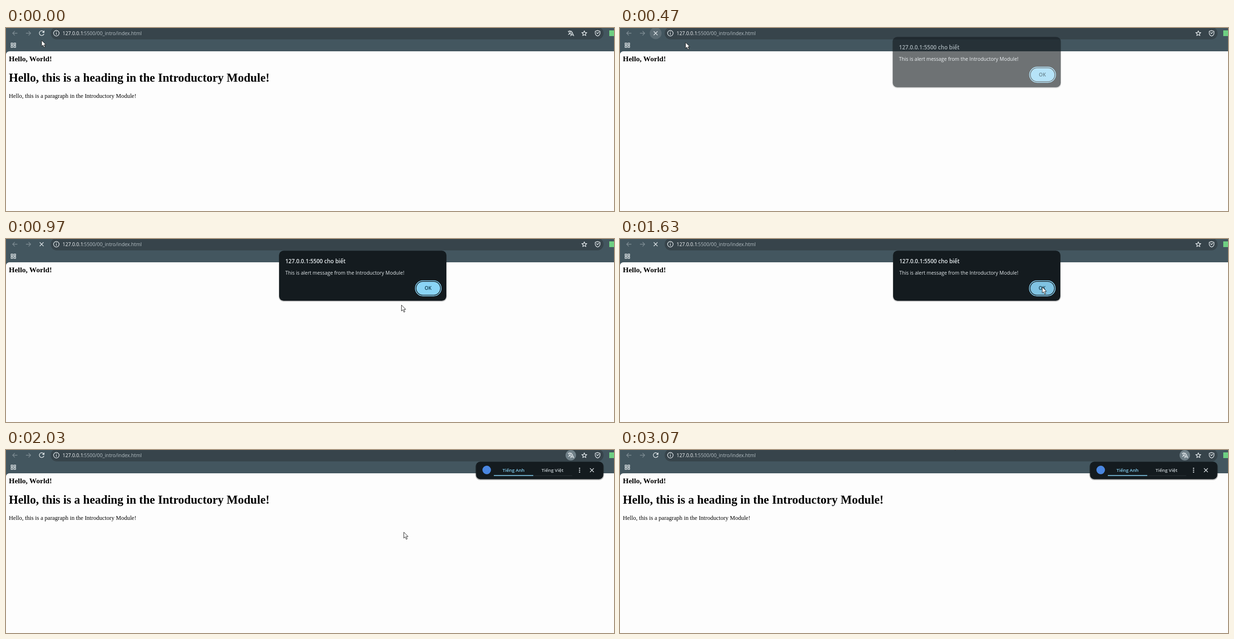
Recreate the animation shown at these times as an HTML page. Size 1280 by 385 pixels, loop 3210 ms.

```html
<!DOCTYPE html>
<html lang="vi">
<head>
<meta charset="utf-8">
<title>Page reload with alert</title>
<style>
  html, body { margin: 0; width: 100%; height: 100%; overflow: hidden; background: #fdfdfd; }
  svg { display: block; width: 100vw; height: 100vh; }
  .ui { font-family: "Open Sans", "Noto Sans", sans-serif; }
  .page { font-family: "Liberation Serif", "Noto Serif", serif; fill: #000; }
  .bold { font-weight: 700; }
  .semi { font-weight: 600; }
  .mid { text-anchor: middle; }
  .line { fill: none; stroke: #e3e9ec; stroke-width: 1.3; }
  .dim { stroke: #7e8c93; }
</style>
</head>
<body>
<svg viewBox="0 0 1280 385">
  <rect width="1280" height="385" fill="#fdfdfd"/>
  <path d="M0 0H1280V49H8Q0 49 0 57Z" fill="#43565f"/>
  <rect x="94" y="-2" width="1164" height="26" rx="13" fill="#37444b"/>

  <!-- toolbar -->
  <g class="line dim">
    <path d="M24 11H14M18.500 6.500L14 11L18.500 15.500"/>
    <path d="M42 11H52M47.500 6.500L52 11L47.500 15.500"/>
  </g>
  <circle id="reloadBg" cx="75" cy="11" r="12.500" fill="#5c6c74"/>
  <g id="reload">
    <path class="line" stroke-width="1.500" d="M79.600 8.500A5 5 0 1 0 80 12"/>
    <path d="M80.800 5V10H75.800Z" fill="#e3e9ec"/>
  </g>
  <path id="stop" class="line" d="M71 7L79 15M79 7L71 15"/>
  <circle class="line" cx="106" cy="11" r="5.800"/>
  <path class="line" d="M106 10V14.200M106 7.300V8.700"/>
  <g class="ui" font-size="10.300">
    <text x="119" y="15" fill="#f4f7f8">127.0.0.1</text>
    <text x="161.500" y="15" fill="#b4bec3">:5500/00_intro/index.html</text>
  </g>
  <g id="translate">
    <circle id="translateBg" cx="1189" cy="11" r="11" fill="#708088"/>
    <g class="line" stroke-width="1.200">
      <path d="M1183 7H1191.500M1187 5V7M1190 7Q1188.500 11.500 1183.500 14M1184.800 8.500Q1186.500 12 1189 13"/>
      <path d="M1188.500 17L1192 9L1195.500 17M1189.700 14.500H1194.300"/>
    </g>
  </g>
  <path id="star" class="line" stroke-linejoin="round"/>
  <path class="line" d="M1245.500 5.300L1250.500 7V11Q1250.500 15 1245.500 17Q1240.500 15 1240.500 11V7ZM1243 9L1245 12L1248.500 8.500"/>
  <rect x="1270" y="5" width="10" height="12" fill="#6fcf82"/>
  <g class="line">
    <rect x="10.700" y="31.700" width="3.600" height="3.600"/>
    <rect x="16.700" y="31.700" width="3.600" height="3.600"/>
    <rect x="10.700" y="37.200" width="3.600" height="3.600"/>
    <rect x="16.700" y="37.200" width="3.600" height="3.600"/>
  </g>

  <!-- page -->
  <g class="page">
    <text class="bold" x="6" y="70" font-size="15.600">Hello, World!</text>
    <g id="content">
      <text class="bold" x="6" y="113" font-size="25">Hello, this is a heading in the Introductory Module!</text>
      <text x="6" y="147" font-size="12.500">Hello, this is a paragraph in the Introductory Module!</text>
    </g>
  </g>

  <!-- alert -->
  <g id="alert" class="ui">
    <rect x="574" y="25" width="354" height="107" rx="10" fill="#000" opacity=".2"/>
    <rect x="575" y="24.500" width="352" height="105.500" rx="9.500" fill="#141b1f"/>
    <text class="semi" x="588" y="51" font-size="11.600" fill="#e4eaed">127.0.0.1:5500 cho biết</text>
    <text x="588" y="74.500" font-size="10.400" fill="#e4eaed">This is alert message from the Introductory Module!</text>
    <rect x="861.800" y="87.800" width="54.400" height="31.800" rx="15.900" fill="none" stroke="#8ad4f5" stroke-width="1.600"/>
    <rect id="ok" x="864" y="90" width="50" height="27.500" rx="13.700"/>
    <text class="semi mid" x="888.500" y="107.300" font-size="10.300" fill="#0d3b4e">OK</text>
  </g>

  <!-- translate bubble -->
  <g id="bubble" class="ui">
    <rect x="988" y="25" width="271" height="38.500" rx="10" fill="#000" opacity=".25"/>
    <rect x="989.500" y="24.500" width="268" height="37" rx="9" fill="#141b1f"/>
    <circle cx="1012" cy="42" r="9" fill="#4a86e0"/>
    <g class="semi mid" font-size="9.700">
      <text x="1068.500" y="46" fill="#86d2f4">Tiếng Anh</text>
      <text x="1150.500" y="46" fill="#cbd3d7">Tiếng Việt</text>
    </g>
    <rect x="1110" y="53.500" width="82" height="1" fill="#2c373c"/>
    <rect x="1027" y="52.800" width="83" height="1.700" fill="#86d2f4"/>
    <g fill="#dfe5e8">
      <circle cx="1207.500" cy="38.500" r="1.300"/>
      <circle cx="1207.500" cy="42.500" r="1.300"/>
      <circle cx="1207.500" cy="46.500" r="1.300"/>
    </g>
    <path class="line" d="M1229.500 38.500L1237.500 46.500M1237.500 38.500L1229.500 46.500"/>
  </g>

  <path id="cursor" d="M0 0V12.500L2.900 9.900L5.100 15L7.300 14L5.100 9.200H9Z" fill="#fff" stroke="#111" stroke-width=".9"/>
</svg>
<script>
  const LOOP = 3210;
  const RELOAD = 240, CONFIRM = 1670;
  const el = id => document.getElementById(id);
  const ui = {};
  for (const id of ["reloadBg", "reload", "stop", "translate", "translateBg", "content",
    "alert", "ok", "bubble", "cursor"]) ui[id] = el(id);

  // pointer path: time, x, y
  const path = [
    [0, 75, 26], [30, 75, 26], [130, 74, 13], [280, 75, 11], [370, 95, 20],
    [470, 137, 30], [560, 225, 62], [700, 480, 140], [850, 720, 163],
    [970, 832, 139], [1070, 888, 130], [1160, 889, 114], [1300, 889, 101],
    [1630, 889, 101], [1800, 888, 102], [1900, 878, 125], [2000, 848, 165],
    [2130, 804, 198], [2300, 783, 204], [2529, 783, 204], [2530, 768, 113],
    [2650, 750, 60], [2800, 725, 25], [3030, 702, -8], [3070, 700, -14.6], [LOOP, 700, -14.6]
  ];

  const ramp = (t, from, to) => Math.min(1, Math.max(0, (t - from) / (to - from)));
  const show = (node, on) => node.setAttribute("visibility", on ? "visible" : "hidden");
  const fade = (node, a) => node.setAttribute("opacity", a);
  const zoom = (x, y, s, dy = 0) =>
    `translate(${x} ${y + dy}) scale(${s}) translate(${-x} ${-y})`;

  function pointer(t) {
    const i = Math.max(1, path.findIndex(p => p[0] > t));
    const [a, b] = [path[i - 1], path[i]];
    const k = ramp(t, a[0], b[0]);
    return [a[1] + (b[1] - a[1]) * k, a[2] + (b[2] - a[2]) * k];
  }

  function draw(t) {
    const loading = t >= RELOAD && t < CONFIRM;
    show(ui.content, !loading);
    show(ui.reload, !loading);
    show(ui.stop, loading);
    show(ui.translate, !loading);
    fade(ui.reloadBg, ramp(t, 80, 140) * (1 - ramp(t, 470, 570)));

    const alertIn = ramp(t, 410, 510) * (1 - ramp(t, CONFIRM, CONFIRM + 140));
    fade(ui.alert, alertIn);
    ui.alert.setAttribute("transform", zoom(751, 77, 1 + 0.012 * (1 - alertIn), -14 * (1 - alertIn)));
    ui.ok.setAttribute("fill", t > 1170 && t < CONFIRM ? "#80c3e2" : "#8ad4f5");

    const bubbleIn = ramp(t, 1730, 1830);
    fade(ui.bubble, bubbleIn);
    ui.bubble.setAttribute("transform", zoom(1123.5, 43, 1 - 0.07 * (1 - bubbleIn)));
    fade(ui.translateBg, bubbleIn);

    ui.cursor.setAttribute("transform", `translate(${pointer(t)})`);
  }

  const star = Array.from({ length: 10 }, (_, i) => {
    const r = i % 2 ? 2.5 : 5.6, a = (i * 36 - 90) * Math.PI / 180;
    return [1217.5 + r * Math.cos(a), 11.5 + r * Math.sin(a)];
  });
  el("star").setAttribute("d", `M${star.join("L")}Z`);

  const start = performance.now();
  function tick() {
    draw((performance.now() - start) % LOOP);
    requestAnimationFrame(tick);
  }
  tick();
</script>
</body>
</html>
```
